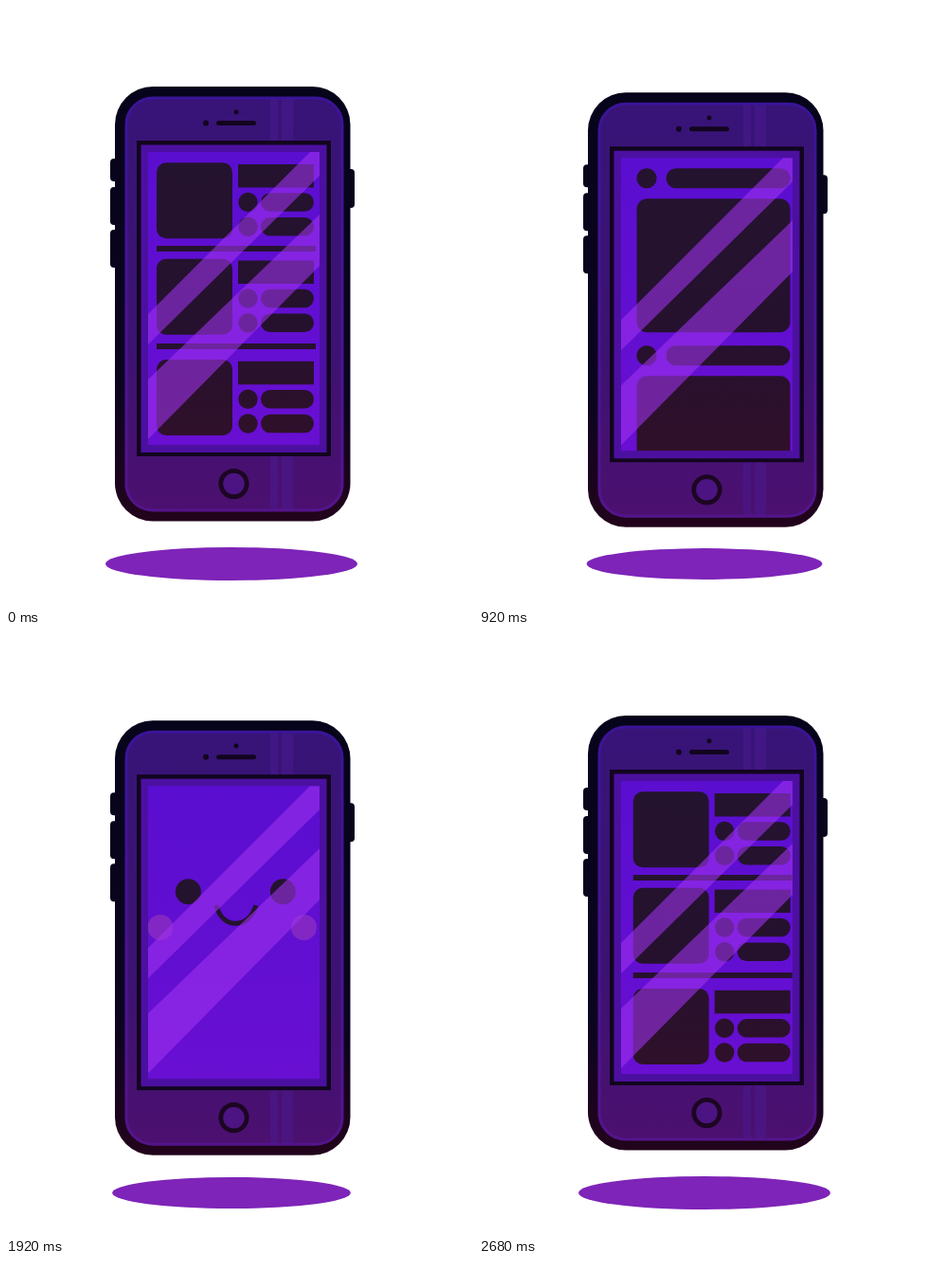
These frames come from a looping animation (493 by 634 pixels, 2720 ms). An HTML page:

```html
<!DOCTYPE html>
<html lang="en">
<head>
<meta charset="utf-8">
<title>Floating phone</title>
<style>
html, body { margin: 0; width: 100%; height: 100%; overflow: hidden; background: #fff; }
svg { display: block; width: 100%; height: 100%; }
</style>
</head>
<body>
<svg viewBox="0 0 493 634">
  <defs>
    <linearGradient id="case" gradientUnits="userSpaceOnUse" x1="0" y1="85" x2="0" y2="543">
      <stop offset="0" stop-color="#06041a"/><stop offset=".7" stop-color="#0c0420"/><stop offset="1" stop-color="#22041c"/>
    </linearGradient>
    <linearGradient id="panel" gradientUnits="userSpaceOnUse" x1="0" y1="96" x2="0" y2="533">
      <stop offset="0" stop-color="#381478"/><stop offset=".6" stop-color="#3c1272"/><stop offset="1" stop-color="#4c1070"/>
    </linearGradient>
    <linearGradient id="rim" gradientUnits="userSpaceOnUse" x1="0" y1="96" x2="0" y2="533">
      <stop offset="0" stop-color="#3a1498"/><stop offset="1" stop-color="#54148c"/>
    </linearGradient>
    <linearGradient id="glass" gradientUnits="userSpaceOnUse" x1="0" y1="154" x2="0" y2="463">
      <stop offset="0" stop-color="#5a0ed0"/><stop offset="1" stop-color="#680fd2"/>
    </linearGradient>
    <linearGradient id="ink" gradientUnits="userSpaceOnUse" x1="0" y1="154" x2="0" y2="463">
      <stop offset="0" stop-color="#24132f"/><stop offset=".6" stop-color="#25112e"/><stop offset="1" stop-color="#30102a"/>
    </linearGradient>
    <clipPath id="view"><rect x="150" y="154" width="181" height="309"/></clipPath>
  </defs>

  <ellipse id="shadow" cx="238" cy="588.5" fill="#7e24b8"/>
  <g id="sparks" fill="none" stroke="#0d0814" stroke-width="2.6" stroke-linecap="round"></g>

  <g id="phone">
    <g fill="url(#case)">
      <rect x="110" y="161" width="12" height="24" rx="4"/>
      <rect x="110" y="191" width="12" height="40" rx="4"/>
      <rect x="110" y="236" width="12" height="40" rx="4"/>
      <rect x="356" y="172" width="12" height="41" rx="4"/>
      <rect x="115" y="85" width="248.500" height="458.500" rx="40"/>
    </g>
    <rect x="127" y="97" width="228" height="435" rx="28" fill="url(#panel)" stroke="url(#rim)" stroke-width="3"/>
    <path d="M279 98h8v433h-8zM291 98h12v433h-12z" fill="#4a1a92" opacity=".5"/>
    <g fill="#12051f">
      <circle cx="211" cy="123.500" r="3"/>
      <circle cx="243" cy="111.800" r="2.500"/>
      <rect x="222" y="121" width="42" height="5" rx="2.500"/>
      <rect x="138" y="142" width="205" height="333"/>
    </g>
    <circle cx="240.500" cy="504" r="13.700" fill="#4c1482" stroke="#1c0622" stroke-width="4.800"/>
    <rect x="142.500" y="146.500" width="196" height="324.500" fill="#4c10a0"/>
    <rect x="150" y="154" width="181" height="309" fill="url(#glass)"/>
    <g clip-path="url(#view)">
      <g id="list" fill="url(#ink)"></g>
      <g id="cards" fill="url(#ink)"></g>
      <g id="face">
        <circle cx="160.500" cy="303.200" r="13.500" fill="#8227c4"/>
        <circle cx="312" cy="303.200" r="13.500" fill="#8227c4"/>
        <g id="open" fill="#24132f">
          <circle cx="190" cy="265.500" r="13.500"/>
          <circle cx="290" cy="265.500" r="13.500"/>
        </g>
        <path id="shut" d="M179 259L201.500 266L179 273M301.500 259L279 266L301.500 273" fill="none" stroke="#24132f" stroke-width="3.200"/>
        <path d="M219.500 280C223 293 231 299 240 299S257 293 261.500 280" fill="none" stroke="#24132f" stroke-width="5"/>
      </g>
      <path d="M150 325L321 154H331V179L150 357ZM150 394L331 220V274L150 457Z" fill="#a032f0" opacity=".58"/>
    </g>
  </g>
</svg>
<script>
const LOOP = 2720, FRAME = 40, SLIDE = 464;
const $ = id => document.getElementById(id);

const box = (x, y, w, h, r = 0) => `<rect x="${x}" y="${y}" width="${w}" height="${h}" rx="${r}"/>`;
const dot = (x, y, r) => `<circle cx="${x}" cy="${y}" r="${r}"/>`;

$('list').innerHTML = [0, 101.5, 207.8].map(y =>
  box(159, 165.2 + y, 80, 80, 10) +
  box(245, 167 + y, 80, 24.5) +
  [207, 232.7].map(c => dot(255.5, c + y, 10.2) + box(269, c + y - 9.8, 56, 19.6, 9.8)).join('')
).join('') + box(159, 253, 168, 6) + box(159, 356, 168, 6);

$('cards').innerHTML = [0, 187].map(y =>
  dot(173.5, 175.5 + y, 10.6) + box(194, 165 + y, 131, 21, 10.5) + box(163, 197 + y, 162, 141, 11)
).join('');

// x, y, radius, kind
const sparks = [
  [73.5, 196, 10, 'o'], [34, 350, 7, 'o'], [80.5, 443.5, 5.5, 'o'],
  [401.5, 295, 10, 'o'], [443, 350.5, 5, 'o'],
  [46, 250.5, 13, '+'], [82.5, 330.5, 5.5, '+'], [409, 210.5, 12, '+'], [399, 433.5, 8, '+']
];
$('sparks').innerHTML = sparks.map(([x, y, r, kind]) =>
  `<g data-at="${x},${y}">` +
  (kind === 'o' ? dot(0, 0, r) : `<path d="M${-r} 0H${r}M0 ${-r}V${r}"/>`) + '</g>'
).join('');

const clamp = v => Math.min(1, Math.max(0, v));
const slide = (t, start) => (1 - Math.cos(Math.PI * clamp((t - start) / SLIDE))) / 2;
const shift = (id, x) => $(id).setAttribute('transform', `translate(${x.toFixed(2)} 0)`);
const show = (id, on) => $(id).setAttribute('display', on ? 'inline' : 'none');

function draw(t) {
  const bob = (1 - Math.cos(2 * Math.PI * t / LOOP)) / 2;
  $('phone').setAttribute('transform', `translate(0 ${(8.2 * bob).toFixed(2)})`);
  $('shadow').setAttribute('rx', 133 - 11.3 * bob);
  $('shadow').setAttribute('ry', 17.5 - 1.4 * bob);

  const a = slide(t, 496), b = slide(t, 1488), c = slide(t, 2256);
  shift('list', t < 1488 ? -195 * a : 204.5 * (1 - c));
  shift('cards', 195 * (1 - a) - 204.5 * b);
  shift('face', 204.5 * (1 - b - c));

  const happy = t >= 2080;
  show('open', !happy);
  show('shut', happy);

  const pop = 1.5 * Math.sin(Math.PI * clamp((t - 2000) / 520));
  show('sparks', pop > 0.01);
  for (const g of $('sparks').children)
    g.setAttribute('transform', `translate(${g.dataset.at}) scale(${pop.toFixed(3)})`);
}

const began = performance.now();
function tick() {
  const t = (performance.now() - began) % LOOP;
  draw(Math.floor(t / FRAME) * FRAME);
  requestAnimationFrame(tick);
}
tick();
</script>
</body>
</html>
```
